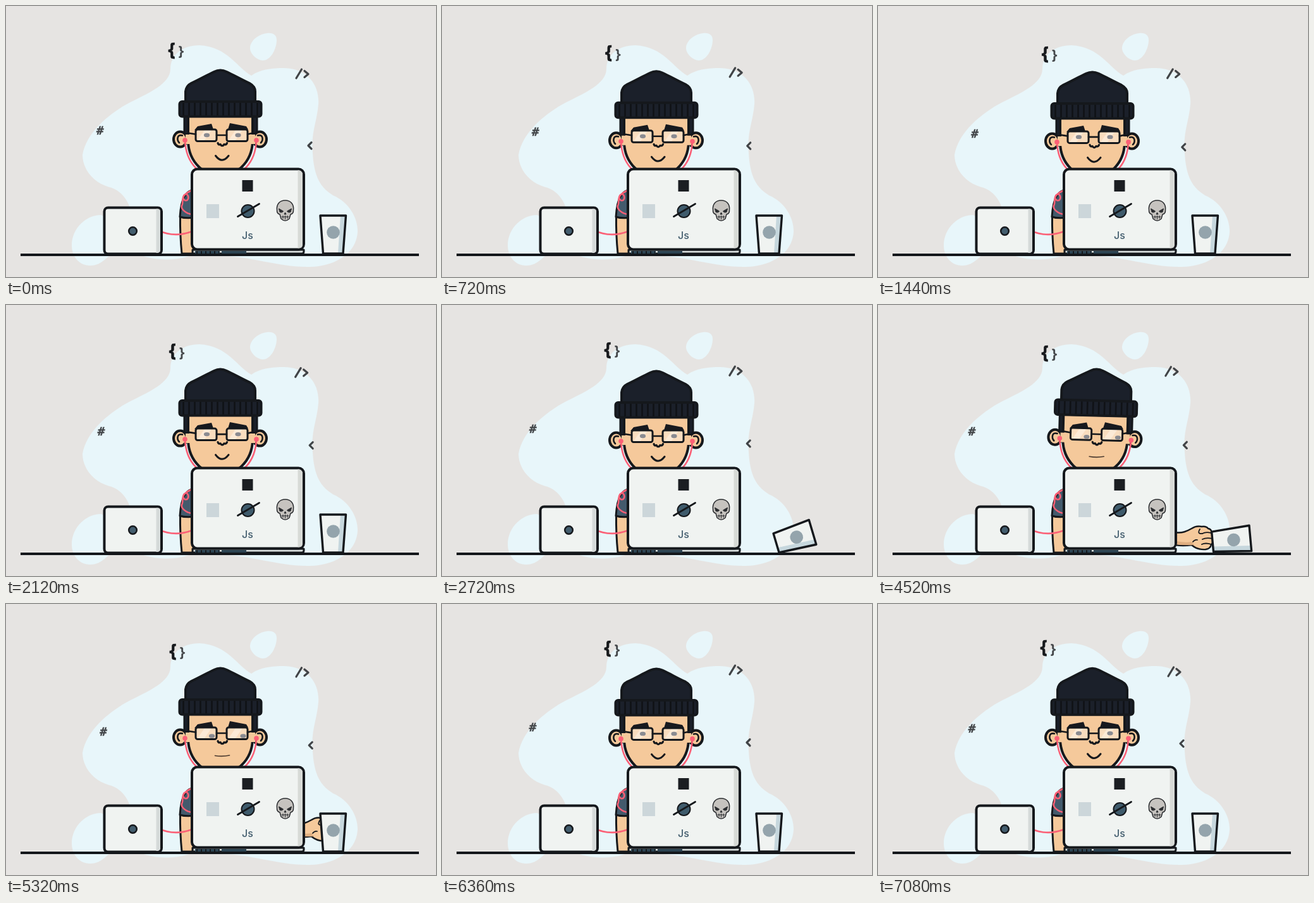
Animation, 680 px wide and 428 px high, one loop 7.12 s. Source, as an HTML page:

```html
<!DOCTYPE html>
<html lang="en">
<head>
<meta charset="utf-8">
<title>Coder at a desk</title>
<style>
  html, body { margin: 0; width: 100%; height: 100%; overflow: hidden; background: #e6e4e2; }
  svg { display: block; width: 680px; height: 428px; }
  text { font-family: "Noto Sans", "Open Sans", sans-serif; font-weight: 700; text-anchor: middle; }
  .label { font-family: Inter, Roboto, sans-serif; font-weight: 500; }
  .ink { stroke: #15181c; stroke-linejoin: round; stroke-linecap: round; }
  .line { fill: none; }
  .skin { fill: #f5c99b; }
  .wool { fill: #1b202a; }
  .paper { fill: #f0f3f1; }
  .pink { fill: none; stroke: #fb6076; stroke-width: 2.6; stroke-linecap: round; }
  .code { fill: none; stroke: #414447; stroke-width: 3.2; stroke-linecap: round; stroke-linejoin: round; }
</style>
</head>
<body>
<svg viewBox="0 0 680 428" stroke-width="4">
  <g fill="#e8f6fa">
    <path d="M260 100C260 76 280 62 306 62C350 64 366 98 388 110C402 100 420 98 440 98C480 99 496 128 494 155C492 182 482 200 485 232C487 268 496 286 517 299C545 311 557 338 556 357C554 390 522 411 480 412C430 413 392 395 330 394H292C270 403 235 402 215 394L197 322C192 304 180 290 163 286C136 278 121 256 121 235C127 203 154 178 184 159C215 141 259 127 260 100Z"/>
    <path d="M104 378C104 350 128 330 150 330L172 340V391C160 392 154 410 133 410C116 410 104 396 104 378Z"/>
    <path d="M428 54C428 67 419 86 406 86C395 85 385 74 386 65C388 52 402 44 413 43C423 42 428 46 428 54Z"/>
  </g>

  <g id="braces">
    <text x="262" y="78.500" font-size="28" fill="#17191c" stroke="#17191c" stroke-width=".6">{</text>
    <text x="276.800" y="78" font-size="22" fill="#45484b">}</text>
  </g>
  <g id="hash">
    <text transform="translate(148 203) skewX(-7)" font-size="18.500" fill="#414447" stroke="#414447" stroke-width=".4">#</text>
  </g>
  <path id="tag" class="code" d="M459 114L467.500 100M472 102.500L478 107.500L472 112.500"/>
  <path id="angle" class="code" d="M483 215.500L478 220.500L483 225.500"/>

  <!-- body -->
  <path class="ink skin" stroke-width="3" d="M275.500 330Q275 362 278 391H300V330Z"/>
  <path class="ink" stroke-width="3" fill="#435a6c" d="M300 290C285 290 277 302 275 333Q284 336 300 334Z"/>
  <path class="pink" d="M294 291C281 297 277 303 283 307C290 309 290 297 284 297C277 300 281 311 278 315C276 321 285 328 294 329"/>

  <g id="head">
    <path class="ink wool" stroke-width="3" d="M282 172H289V208H282ZM389 172H397V208H389Z"/>
    <ellipse class="ink skin" cx="275.500" cy="210.500" rx="10.500" ry="12"/>
    <ellipse class="ink skin" cx="401.500" cy="210.500" rx="10.500" ry="12"/>
    <path class="ink line" stroke-width="2.600" d="M279 204.500C270 202 270 212 274 216M398 204.500C407 202 407 212 403 216"/>
    <path class="ink skin" d="M288 174V214C289 248 316 269 339 269C362 269 389 248 390 214V174Z"/>
    <path fill="#f5c99b" d="M284 203H291V218H284ZM387 203H394V218H387Z"/>
    <path fill="#17191e" d="M298 196L303 190L325 186L328 195ZM354 185L380 190L383 195L351 195Z"/>
    <g fill="#fff" fill-opacity=".36">
      <path d="M301 196H332V213H301ZM350 196H381V213H350Z"/>
      <path d="M303 212L314 196H325L314 212ZM352 212L363 196H374L363 212Z"/>
    </g>
    <g id="eyes" fill="#8a8b91">
      <ellipse cx="317.500" cy="204" rx="4.600" ry="3.200"/>
      <ellipse cx="367" cy="204" rx="4.600" ry="3.200"/>
    </g>
    <g class="ink line" stroke-width="3">
      <rect x="300" y="195" width="33" height="18.500" rx="3"/>
      <rect x="349" y="195" width="33" height="18.500" rx="3"/>
      <path stroke-width="2.600" d="M333 204H349M300 202.500L287 200.500M382 202.500L391 200.500"/>
      <path stroke-width="3.200" d="M335 216.500Q336 220 339 218.500Q342 223 345 218.500Q348 220 349.500 216.500"/>
      <path id="smile" d="M331.500 236.500Q341.500 250 352 236.500"/>
    </g>
    <path id="flat" fill="none" stroke="#4b3a2f" stroke-width="1.600" stroke-linecap="round" d="M330.500 239.500Q342 241.500 353.500 239"/>
    <path class="ink wool" d="M284 152V135Q285 126 293 122C306 116 318 109 329 104Q339 99 349 104C360 109 372 116 385 122Q394 127 394 135V152Z"/>
    <rect class="ink wool" x="274.500" y="151" width="129" height="23.500" rx="4"/>
    <path id="ribs" stroke="#101216" stroke-width="2.600" fill="none"/>
    <path class="pink" d="M283 212C284 234 291 249 305 260M396 212C395 234 388 249 374 260"/>
    <g fill="#fb6076"><circle cx="283" cy="212" r="3.800"/><circle cx="396" cy="212" r="3.800"/></g>
  </g>

  <!-- reaching arm -->
  <g id="arm">
    <path class="ink skin" stroke-width="2.400" d="M390 359H470C481 361 489 357 496 353Q503 348 512 350Q519 349 522 353Q528 354 527 360Q532 363 529 369Q532 375 527 378Q526 385 518 386Q505 387 496 379Q482 381 470 379H390Z"/>
    <path fill="#dfae80" d="M390 373H472Q486 376 496 374L500 379Q482 380 470 378H390Z"/>
    <path class="ink line" stroke-width="1.800" d="M527 360Q518 358 513 361M529 369Q519 367 513 370M527 378Q518 375 512 378M513 361Q504 362 509 354M498 374Q501 370 505 371"/>
  </g>

  <!-- small laptop and cable -->
  <path class="pink" d="M247 357C261 362 276 363 294 356"/>
  <rect class="ink paper" x="155.500" y="318.500" width="90.500" height="73" rx="6"/>
  <path fill="#d5dad9" d="M237.500 320.500H240Q244 321 244 326V385Q244 389 240 390H237.500Z"/>
  <circle class="ink" stroke-width="2.500" fill="#435d6e" cx="200.500" cy="355.500" r="6.300"/>

  <!-- main laptop -->
  <path class="ink" stroke-width="3" fill="#d9dfde" d="M295 385H471V388Q471 391 467 391H295Z"/>
  <path fill="#2c4352" d="M299 387H338V391H299ZM341 387H380V391H341Z"/>
  <path stroke="#15181c" stroke-dasharray="2 5" d="M301 389H337"/>
  <rect class="ink paper" x="294" y="257.500" width="177" height="127" rx="8.500"/>
  <path fill="#d7dad6" d="M461.500 259.500H464Q469 261 469 266V377Q469 382 464 382.500H461.500Z"/>
  <rect x="373.500" y="275" width="17" height="18" fill="#1b1e22"/>
  <rect x="317" y="313" width="20" height="22" fill="#ccd6da"/>
  <circle class="ink" stroke-width="2" fill="#3f5b6c" cx="382.500" cy="324" r="10"/>
  <path class="ink" stroke-width="2.800" d="M366.500 332.500L400.500 312.500"/>
  <text class="label" x="382" y="367.500" font-size="16" fill="#435d6e">Js</text>
  <g stroke="#2b2d30" stroke-width="1.500" stroke-linejoin="round">
    <path fill="#c6c3bf" d="M441.500 307C432 307 427.500 314 428.500 322Q428 328 433 329L435 336Q441.500 342 448 336L450 329Q455 328 454.500 322C455.500 314 451 307 441.500 307Z"/>
    <path fill="#2b2d30" stroke-width="1" d="M431.500 320L438.500 324Q437 327 433 325.500ZM451.500 320L444.500 324Q446 327 450 325.500ZM441.500 326L440 329H443Z"/>
    <path fill="none" stroke-width="1" d="M435.500 333H447.500M438 331V336M441.500 331V337M445 331V336"/>
  </g>

  <g id="cup">
    <path class="paper" d="M497 331H537.500L533 391H501.500Z"/>
    <path fill="#c6d7dd" d="M529 331H537.500L533 391H525Z"/>
    <circle cx="517.500" cy="357.500" r="10.300" fill="#94a4ac"/>
    <path class="ink line" stroke-width="3.400" d="M497 331H537.500L533 391H501.500Z"/>
  </g>
  <path stroke="#14171b" d="M23 393H653"/>
</svg>
<script>
const LOOP = 7120, STEP = 40, TURN = 2 * Math.PI;
const DRIFT = LOOP / 2, NOD = LOOP / 17;
const el = id => document.getElementById(id);

const smooth = u => u * u * (3 - 2 * u);
const linear = u => u;
const falling = u => u ** 1.5;

// 0 before a, 1 after b.
const ramp = (t, a, b, ease = smooth) => ease(Math.min(1, Math.max(0, (t - a) / (b - a))));
// Up over a..b, down again over c..d.
const pulse = (t, a, b, c, d) => ramp(t, a, b) - ramp(t, c, d);

const move = (id, x, y, more = '') =>
  el(id).setAttribute('transform', `translate(${x} ${y}) ${more}`);

el('ribs').setAttribute('d',
  Array.from({ length: 14 }, (_, i) => `M${280.5 + i * 9} 153V173`).join(''));

// Sizes of a slow wave and one twice as fast, across and down.
const drifts = {
  braces: { x: [1.3, 0], y: [3.4, -.5] },
  hash: { x: [3.3, 2.7], y: [2.9, .8] },
  tag: { x: [0, 2.1], y: [.5, 1.5] },
  angle: { x: [.8, -2.1], y: [1.7, .9] }
};
const LAG = .39 * TURN;

function drift(t) {
  const p = t / DRIFT * TURN;
  const slow = Math.cos(p - LAG) - Math.cos(LAG);
  const fast = Math.cos(2 * p) - 1;
  const sway = ([a, b]) => a * slow + b * fast;
  for (const id in drifts) move(id, sway(drifts[id].x), sway(drifts[id].y));
}

function head(t) {
  const look = pulse(t, 3760, 4120, 4720, 5200);
  const nod = 1 - pulse(t, 3600, 3760, 5440, 5640);
  const glance = pulse(t, 3640, 3800, 5440, 5640);
  const dip = 1.5 * nod * (1 - Math.cos(TURN * t / NOD));
  move('head', look, dip, `rotate(${1.5 * look} 342 340)`);
  move('eyes', 8 * glance, 4.5 * glance);
  el('smile').style.display = glance > .5 ? 'none' : '';
  el('flat').style.display = glance > .5 ? '' : 'none';
}

function armAndCup(t) {
  const reach = pulse(t, 3760, 4240, 5400, 5720);
  const lift = ramp(t, 4640, 5240);
  move('arm', -64 * (1 - reach) - 13 * lift, -12 * lift);

  const fall = ramp(t, 2320, 2760, falling);
  const raise = ramp(t, 4640, 5280, linear);
  const pull = ramp(t, 4360, 4480) * (1 - raise);
  const sink = 5 * Math.sin(Math.PI * raise);
  move('cup', -2.5 * pull, sink - 1.5 * pull, `rotate(${84.8 * (fall - raise)} 533 391)`);
}

const start = performance.now();
function tick() {
  const now = (performance.now() - start) % LOOP;
  const t = Math.floor(now / STEP) * STEP;
  drift(t);
  head(t);
  armAndCup(t);
  requestAnimationFrame(tick);
}
tick();
</script>
</body>
</html>
```
